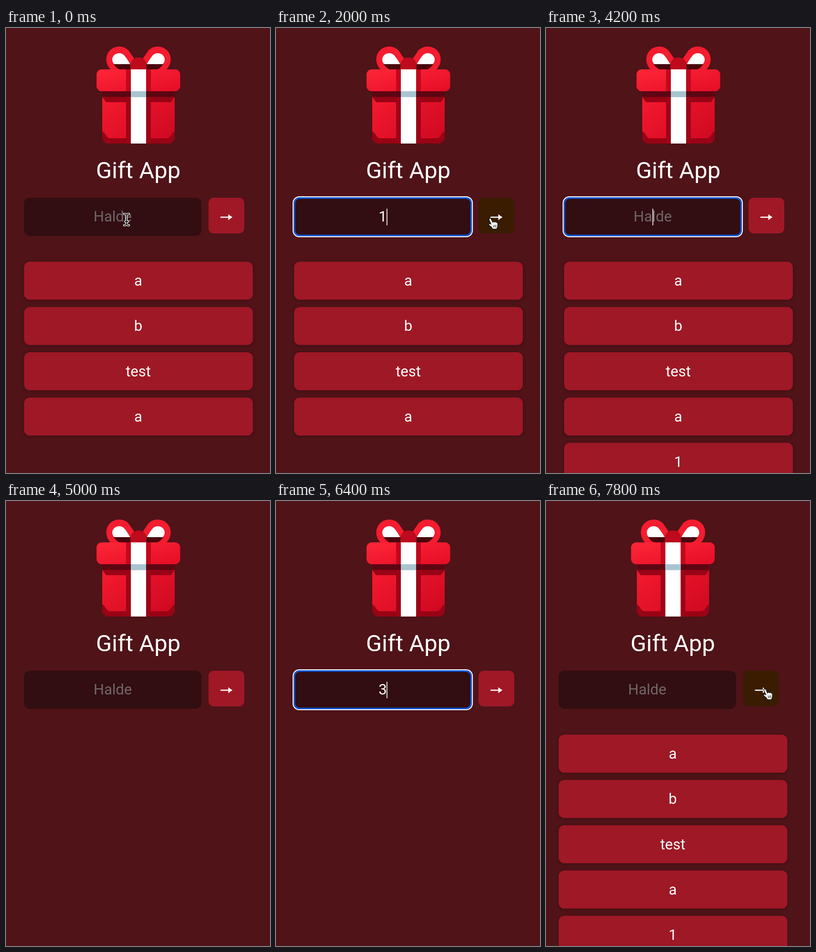
An HTML page that plays this animation: 554x936 px, repeating every 8 s.

```html
<!DOCTYPE html>
<html lang="en">
<head>
<meta charset="utf-8">
<title>Gift App</title>
<style>
  html, body { margin: 0; width: 100%; height: 100%; overflow: hidden; background: #4f1318; }
  svg { display: block; width: 100vw; height: 100vh; }
  text { font: 400 31px Roboto, sans-serif; fill: #fff; text-anchor: middle; }
  .title { font-size: 49px; }
  .item rect { fill: #9f1825; filter: drop-shadow(0 1px 3px rgba(0, 0, 0, .25)); }
  .ring { fill: none; }
</style>
</head>
<body>
<svg viewBox="0 0 554 936">
  <defs>
    <linearGradient id="lid" x1="0" y1="0" x2="1" y2="1">
      <stop offset="0" stop-color="#ff2638"/><stop offset="1" stop-color="#e40d26"/>
    </linearGradient>
    <linearGradient id="box" x1="0" y1="0" x2="1" y2="1">
      <stop offset="0" stop-color="#fa1c30"/><stop offset="1" stop-color="#cc0820"/>
    </linearGradient>
    <clipPath id="boxClip"><rect x="202" y="120" width="152" height="123" rx="14"/></clipPath>
    <g id="loop">
      <path fill="#f41c2f" d="M270 66L257 47C251 41.500 245 39 238 39C222 39 210.500 51 210.500 66C210.500 75 214 82 221 89H264Z"/>
      <path fill="#fff" d="M238 53C229 53 223 59 223 66.500C223 70.500 225 74 228 77H261C257 70 253 63 248 57.500C245 54.500 242 53 238 53Z"/>
      <path fill="#4a060d" d="M226 76H264V88H241C234 86 229 81 226 76Z"/>
    </g>
  </defs>
  <rect width="554" height="936" fill="#4f1318"/>
  <g id="page">
    <g id="gift">
      <use href="#loop"/>
      <use href="#loop" transform="matrix(-1 0 0 1 556 0)"/>
      <path fill="#bd0a1c" d="M261 88V78C262 68 268 62 278 62S294 68 295 78V88Z"/>
      <g clip-path="url(#boxClip)">
        <rect x="202" y="120" width="152" height="123" fill="url(#box)"/>
        <path fill="#980315" d="M202 145H354L346 156H210Z"/>
        <path fill="#980315" d="M202 218C209 219 210 232 219 232H337C346 232 347 219 354 218V243H202Z"/>
        <path fill="#9d0418" d="M252 133H304V243H252Z"/>
        <path fill="#5d0612" d="M202 133H354V145H202Z"/>
      </g>
      <rect x="190" y="87" width="175.500" height="46" rx="11" fill="url(#lid)"/>
      <path fill="#c1081d" d="M252 87H304V133H252Z"/>
      <path fill="#fff" d="M262 87H294V243H262Z"/>
      <path fill="#a9c4d1" d="M262 133H294V145.500H262Z"/>
    </g>
    <text class="title" x="277.500" y="316">Gift App</text>
    <rect x="38" y="357" width="372" height="80" rx="12" fill="#320d11"/>
    <text id="entry" x="224" y="407"></text>
    <rect id="caret" x="223.500" y="380" width="1.600" height="35" fill="#fff"/>
    <g id="focus" class="ring">
      <rect x="38.500" y="357.500" width="371" height="79" rx="11" stroke="#0f57d6" stroke-width="3.400"/>
      <rect x="35.900" y="354.900" width="376.200" height="84.200" rx="13" stroke="#fff" stroke-width="2"/>
    </g>
    <rect id="button" x="425" y="357" width="75" height="75" rx="11"/>
    <path fill="#fff" d="M450 396.700H466.500V391.800Q471 395.500 475.300 398Q471 400.500 466.500 404.200V399.300H450Z"/>
    <g id="list"></g>
  </g>
  <g id="cursor">
    <g id="beam" fill="none" stroke-linecap="round" stroke-linejoin="round">
      <path id="beamLine" stroke="#fff" stroke-width="4.500" d="M-5 -12Q0 -12 0 -8Q0 -12 5 -12M0 -8V8M-5 12Q0 12 0 8Q0 12 5 12M-3 4H3"/>
      <path stroke="#111" stroke-width="1.800" d="M-5 -12Q0 -12 0 -8Q0 -12 5 -12M0 -8V8M-5 12Q0 12 0 8Q0 12 5 12M-3 4H3"/>
    </g>
    <g id="hand" transform="translate(-8 -10)" stroke="#111" stroke-linejoin="round">
      <path fill="#fff" stroke-width="1.300" d="M0 3C-.5 0 3 -1 4.500 2L8 9C9 6.500 11.500 6.500 12 8.500C13 7 15 7.500 15.300 9.200C16.500 8.500 18.300 9.500 18.300 12L18 18L16 23H7.500L5.500 19L.5 15C-1.500 12.500 .5 10.500 3 12L4.500 13Z"/>
      <path fill="none" d="M9 14.500L9.700 19.500M11.800 14L12.200 19.500M14.600 13.700L14.600 19.500"/>
    </g>
    <path id="arrow" fill="#111" stroke="#fff" stroke-width="1.500" stroke-linejoin="round"
      d="M-8 -12V10L-3 5.500L.5 13L4.500 11.200L1 4H8Z"/>
  </g>
</svg>
<script>
const LOOP = 8000, STEP = 200;
const $ = id => document.getElementById(id);
const show = (id, on) => { $(id).style.display = on ? "" : "none"; };

const hint = "Halde";
const items = ["a", "b", "test", "a", "1"];
const typed = [[1600, 2400, "1"], [3800, 4200, "2"], [6400, 7800, "3"]];
const focused = [[400, 2400], [3400, 5000], [6200, 7600]];
const counts = [[0, 4], [2400, 5], [5000, 0], [7800, 5]];
// Pointer runs: [time, x, y] waypoints; hidden between runs.
const runs = [
  [[0, 253, 403], [400, 253, 403], [800, 284, 414], [1200, 294, 418]],
  [[1800, 380, 414], [2000, 455, 410], [2600, 456, 411], [2800, 445, 413],
   [3000, 340, 408], [3200, 282, 405], [3600, 280, 405]],
  [[6000, 256, 418], [6200, 240, 405]],
  [[6800, 375, 470], [7000, 445, 515], [7200, 463, 526], [7400, 465, 405], [8000, 465, 405]]
];

$("list").innerHTML = items.map((label, i) => {
  const y = 491.5 + i * 95.25;
  return `<g class="item"><rect x="38" y="${y}" width="480" height="80" rx="12"/>` +
    `<text x="277.5" y="${y + 50.5}">${label}</text></g>`;
}).join("");
const rows = [...$("list").children];

const during = (spans, t) => spans.find(([from, to]) => t >= from && t < to);

function pointerAt(t) {
  const run = runs.find(r => t >= r[0][0] && t <= r[r.length - 1][0]);
  if (!run) return null;
  const i = Math.max(1, run.findIndex(p => p[0] >= t));
  const [t0, x0, y0] = run[i - 1], [t1, x1, y1] = run[i];
  const k = (t - t0) / (t1 - t0);
  return [x0 + (x1 - x0) * k, y0 + (y1 - y0) * k];
}

function render(now) {
  const t = Math.floor(now % LOOP / STEP) * STEP;
  const shift = t >= 7800 ? -11.5 : 0;
  $("page").setAttribute("transform", `translate(${shift} 0)`);

  const count = counts.filter(c => c[0] <= t).pop()[1];
  rows.forEach((row, i) => { row.style.display = i < count ? "" : "none"; });

  const entry = during(typed, t), focus = during(focused, t);
  $("entry").textContent = entry ? entry[2] : hint;
  $("entry").style.fill = entry ? "#fff" : "#706768";
  show("focus", focus);

  // The caret restarts its blink after each edit.
  const edits = [...focused.map(f => f[0]), ...typed.flatMap(e => e.slice(0, 2))];
  const last = Math.max(0, ...edits.filter(e => e <= t));
  show("caret", focus && (t - last) % 1000 < 500);
  $("caret").setAttribute("x", entry ? 232 : 223.5);

  const pos = pointerAt(t);
  let kind = "";
  if (pos) {
    const [x, y] = pos, px = x - shift;
    const inside = (left, right, bottom) => px >= left && px <= right && y >= 357 && y <= bottom;
    kind = inside(425, 500, 432) ? "hand" : inside(38, 410, 437) ? "beam" : "arrow";
    $("cursor").setAttribute("transform", `translate(${x} ${y})`);
  }
  for (const id of ["beam", "hand", "arrow"]) show(id, id === kind);
  $("button").setAttribute("fill", kind === "hand" ? "#3a1c00" : "#a01826");
}

const start = performance.now();
function tick() {
  render(performance.now() - start);
  requestAnimationFrame(tick);
}
tick();
</script>
</body>
</html>
```
